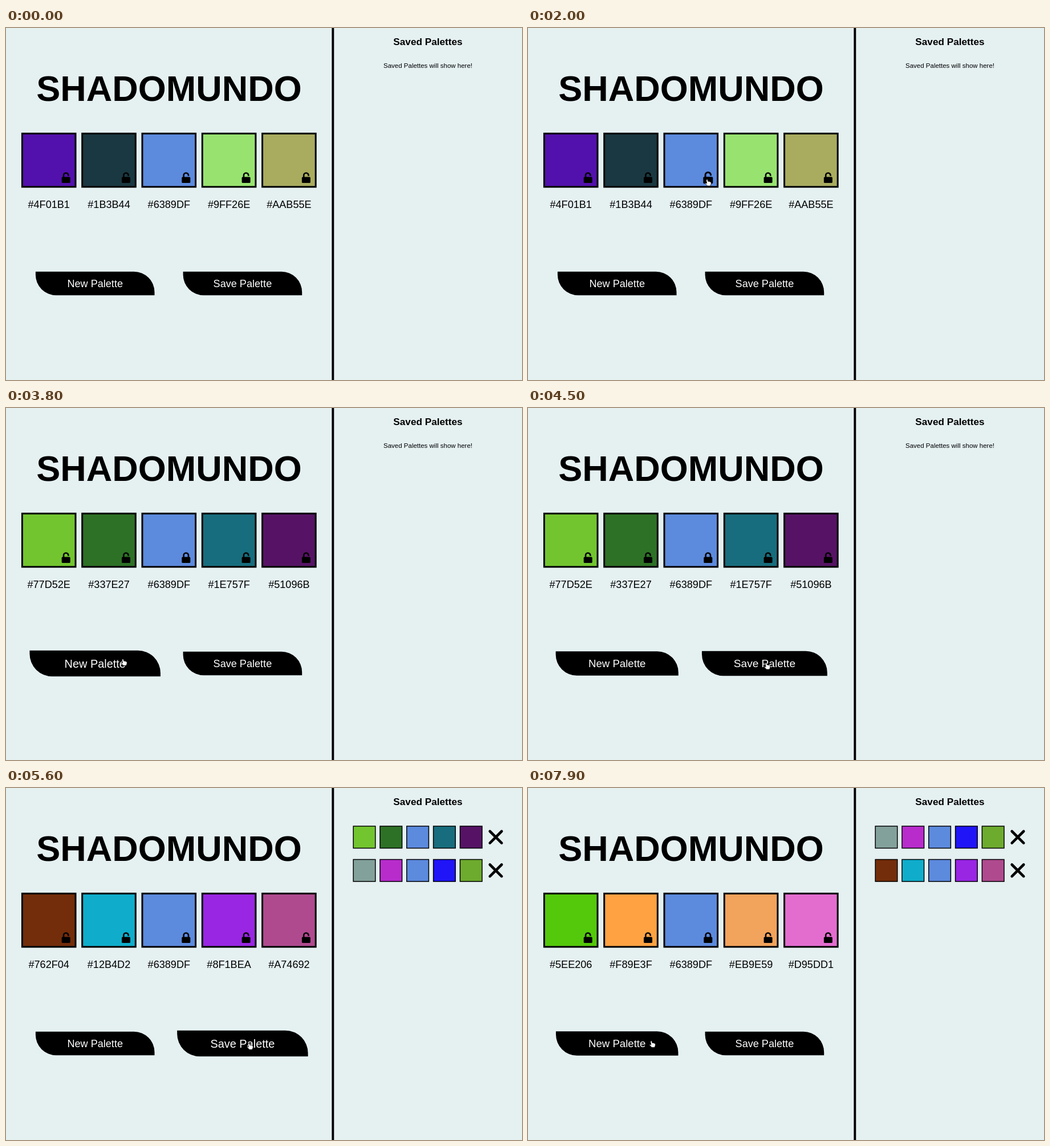
Write an HTML page that moves like this. It is 905 px wide and 618 px high and loops after 8000 ms.

```html
<!DOCTYPE html>
<html lang="en">
<head>
<meta charset="utf-8">
<title>Palette maker</title>
<style>
  html, body { margin: 0; width: 100%; height: 100%; overflow: hidden; background: #e5f0f1; }
  svg { display: block; width: 100%; height: 100%; }
  text { font-family: "Liberation Sans", Arial, sans-serif; text-anchor: middle; }
  .title { font-size: 63px; font-weight: bold; }
  .heading { font-size: 17.2px; font-weight: bold; }
  .note { font-size: 11.5px; }
  .label { font-size: 18.1px; }
  .button text { fill: #fff; }
  .swatch { stroke: #000; stroke-width: 3px; }
  .chip { stroke: #000; stroke-width: 1.5px; }
  .shackle { fill: none; stroke: #000; stroke-width: 2.6px; }
  .cross { fill: none; stroke: #000; stroke-width: 4.6px; stroke-linecap: round; }
  .hand { fill: #fff; stroke: #000; stroke-width: .8px; stroke-linejoin: round; }
  .arrow { fill: #000; stroke: #fff; stroke-width: .9px; stroke-linejoin: round; }
</style>
</head>
<body>
<svg id="stage" viewBox="0 0 905 618" xmlns="http://www.w3.org/2000/svg">
  <rect x="571.4" width="3.9" height="618"/>
  <text class="title" x="286" y="128">SHADOMUNDO</text>
  <text class="heading" x="740" y="30">Saved Palettes</text>
  <text class="note" id="note" x="740" y="70">Saved Palettes will show here!</text>
</svg>
<script>
const LOOP = 8000, STEP = 100, HOVER = 500;
const COUNT = 5, LOCKED = 2;

const palette = (labels, fills) => ({ labels: labels.split(' '), fills: fills.split(' ') });
const palettes = [
  palette('4F01B1 1B3B44 6389DF 9FF26E AAB55E', '#5211ac #1a3841 #5c8add #98e370 #a9ac5e'),
  palette('77D52E 337E27 6389DF 1E757F 51096B', '#72c52f #2d7126 #5c8add #176d7d #561365'),
  palette('85A49C AC14CF 6389DF 2206FA 73BA2F', '#83a19b #b82ccc #5c8add #2015f7 #6dab2e'),
  palette('762F04 12B4D2 6389DF 8F1BEA A74692', '#732d0a #0fadcb #5c8add #9926e3 #b04a8f'),
  palette('5EE206 F89E3F 6389DF EB9E59 D95DD1', '#54c80b #ffa242 #5c8add #f2a35c #e36dcf')
];

const clicks = [
  { time: 2200, action: 'lock' },
  { time: 3400, action: 'new' },
  { time: 4900, action: 'save' },
  { time: 5300, action: 'save' },
  { time: 5800, action: 'save' },
  { time: 7200, action: 'remove' }
];

// the pointer rests at each stop and glides between them
const stops = [
  { from: 0, to: 100, x: 614, y: 184 },
  { from: 1000, to: 1400, x: 306, y: 271 },
  { from: 1500, to: 2350, x: 310, y: 265 },
  { from: 2770, to: 4200, x: 201, y: 440 },
  { from: 4540, to: 5850, x: 422, y: 447 },
  { from: 6500, to: 6650, x: 849, y: 142 },
  { from: 7000, to: 7200, x: 857, y: 82 },
  { from: 7930, to: LOOP, x: 209, y: 445 }
];

const stage = document.getElementById('stage');
const note = document.getElementById('note');

function add(parent, tag, attrs = {}) {
  const el = document.createElementNS('http://www.w3.org/2000/svg', tag);
  for (const key in attrs) el.setAttribute(key, attrs[key]);
  return parent.appendChild(el);
}

function place(el, x, y, scale = 1) {
  el.setAttribute('transform', `translate(${x} ${y}) scale(${scale})`);
}

const show = (el, on) => el.setAttribute('visibility', on ? 'visible' : 'hidden');
const clamp = k => Math.min(1, Math.max(0, k));
const easeOut = k => 1 - (1 - clamp(k)) ** 2.6;
const glide = k => k * k * (3 - 2 * k);

function pointer(t) {
  const i = Math.max(1, stops.findIndex(s => t < s.to));
  const a = stops[i - 1], b = stops[i];
  const k = glide(clamp((t - a.to) / (b.from - a.to)));
  return { x: a.x + (b.x - a.x) * k, y: a.y + (b.y - a.y) * k };
}

// a box the pointer can rest on, grown and shrunk with a transition
function hoverBox(cx, cy, w, h) {
  const has = t => {
    const p = pointer(t);
    return Math.abs(p.x + 3 - cx) < w / 2 && Math.abs(p.y - cy) < h / 2;
  };
  const turns = [];
  for (let t = 10; t < LOOP; t += 10) {
    if (has(t) !== has(t - 10)) turns.push({ time: t, sign: has(t) ? 1 : -1 });
  }
  const amount = t => turns.reduce((sum, turn) => sum + turn.sign * easeOut((t - turn.time) / HOVER), 0);
  return { has, amount };
}

function stateAt(t) {
  const state = { current: 0, saved: [], locked: false };
  for (const { time, action } of clicks) {
    if (time > t) break;
    if (action === 'lock') state.locked = true;
    if (action === 'save') state.saved.push(state.current);
    if (action === 'new' || action === 'save') state.current++;
    if (action === 'remove') state.saved.shift();
  }
  return state;
}

const each = (n, make) => Array.from({ length: n }, (_, i) => make(i));

const swatches = each(COUNT, i => {
  const x = 75.2 + i * 105.3;
  const box = add(stage, 'rect', { class: 'swatch', x: x - 46.8, y: 185.3, width: 93.6, height: 93.6 });
  const label = add(stage, 'text', { class: 'label', x, y: 315.5 });
  const lock = add(stage, 'g');
  add(lock, 'rect', { x: -7.5, y: -1.2, width: 15, height: 10.6, rx: 1.7 });
  const shackle = add(lock, 'path', { class: 'shackle' });
  return { box, label, lock, shackle, x: x + 30 };
});
const lockHover = hoverBox(swatches[LOCKED].x, 262.5, 11, 20);

function makeButton(x, label) {
  const y = 448.5;
  const g = add(stage, 'g', { class: 'button' });
  add(g, 'path', { d: 'M-104.3 -20.7H68.3A36 36 0 0 1 104.3 15.3V20.7H-68.3A36 36 0 0 1 -104.3 -15.3Z' });
  add(g, 'text', { class: 'label', y: 6.5 }).textContent = label;
  const hover = hoverBox(x, y, 208, 41);
  return { hover, draw: t => place(g, x, y, 1 + .1 * hover.amount(t)) };
}
const buttons = [makeButton(156.2, 'New Palette'), makeButton(414.9, 'Save Palette')];

const rows = each(3, i => {
  const g = add(stage, 'g');
  const y = 86.3 + i * 58.5;
  const chips = each(COUNT, j =>
    add(g, 'rect', { class: 'chip', x: 609.2 + j * 46.8, y: y - 19.3, width: 38.6, height: 38.6 }));
  const cross = add(g, 'path', { class: 'cross', d: 'M-10.3 -10.3L10.3 10.3M10.3 -10.3L-10.3 10.3' });
  return { g, chips, cross, y, hover: hoverBox(859, y, 28, 28) };
});

const hand = add(stage, 'path', {
  class: 'hand',
  d: 'M3 1.2Q4.2 -.2 5 1.4L5.8 4.4Q7 3.6 7.7 4.6Q9 4.1 9.6 5.2Q11.2 5 11.3 6.8Q11.3 9.6 9.9 12.2H4.8L1 8.3Q.5 6.9 2 7L3.6 7.9L2.6 2.6Z'
});
const arrow = add(stage, 'path', { class: 'arrow', d: 'M.5 .5V10.6L2.9 8.4L4.5 12L6.2 11.2L4.7 7.8H8Z' });

function draw(t) {
  const { current, saved, locked } = stateAt(t);

  swatches.forEach((s, i) => {
    const target = i === LOCKED;
    s.box.setAttribute('fill', palettes[current].fills[i]);
    s.label.textContent = '#' + palettes[current].labels[i];
    s.shackle.setAttribute('d', `M-4.2 0V-4A4.2 4.2 0 0 1 4.2 -4V${target && locked ? 0 : -3}`);
    place(s.lock, s.x, 262.7, target ? 1 + .13 * lockHover.amount(t) : 1);
  });

  buttons.forEach(button => button.draw(t));

  show(note, !saved.length);
  rows.forEach((row, i) => {
    show(row.g, i < saved.length);
    if (i >= saved.length) return;
    row.chips.forEach((chip, j) => chip.setAttribute('fill', palettes[saved[i]].fills[j]));
    place(row.cross, 859, row.y, 1 + .1 * row.hover.amount(t));
  });

  const { x, y } = pointer(t);
  const pointing = lockHover.has(t) || buttons.some(button => button.hover.has(t));
  place(hand, x, y);
  place(arrow, x, y);
  show(hand, pointing);
  show(arrow, !pointing && t > 0);
}

const start = performance.now();
function tick() {
  const t = (performance.now() - start) % LOOP;
  draw(Math.floor(t / STEP) * STEP);
  requestAnimationFrame(tick);
}
tick();
</script>
</body>
</html>
```
